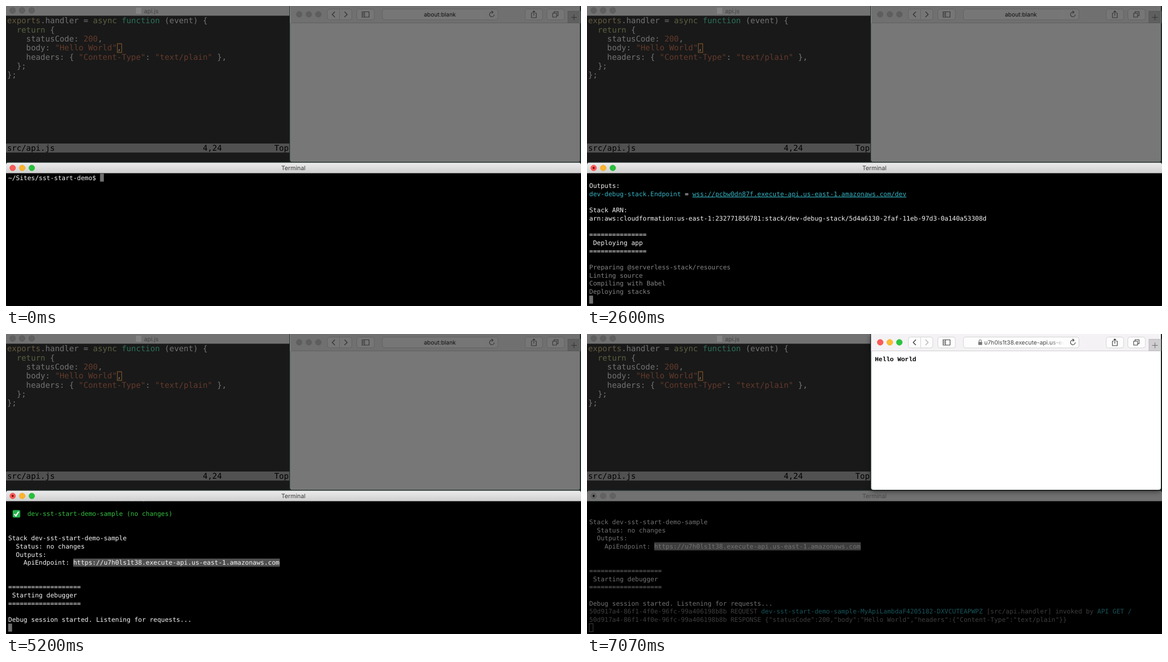
Write an HTML page that moves like this. It is 1035 px wide and 541 px high and loops after 8000 ms.

```html
<!DOCTYPE html>
<html lang="en">
<head>
<meta charset="utf-8">
<title>Terminal demo</title>
<style>
html, body { margin: 0; width: 100%; height: 100%; overflow: hidden; background: #1c2b28; }
svg { display: block; width: 100vw; height: 100vh; }
text { white-space: pre; text-rendering: geometricPrecision; }
.ui { font-family: Inter, Roboto, sans-serif; }
.code { font: 14.28px "DejaVu Sans Mono", monospace; fill: #727272; }
.log { font: 11.436px "DejaVu Sans Mono", monospace; fill: #f4f4f4; }
.page { font: bold 11.25px "Liberation Mono", monospace; }
.off { display: none; }

.code .id { fill: #635a3f; }
.code .kw { fill: #586040; }
.code .fn { fill: #2c7055; }
.code .str { fill: #633a2b; }

.log .dim { fill: #858585; }
.log .cyan { fill: #35b5c3; }
.log .link { fill: #35b5c3; text-decoration: underline; }
.log .ok { fill: #33bf3f; }
#sel { fill: #505050; }
#cursor { fill: #6e6e6e; }
#term.idle #sel { fill: #848484; }
#term.idle #cursor { fill: none; stroke: #8c8c8c; }
#term.idle .bar { fill: #f4f4f4; }
#term.idle .title { fill: #999; }
#term.idle .light { fill: #d2d2d2; stroke: #bcbcbc; }
#term.idle #busy { fill: #222; }

.icon { fill: none; stroke: #707070; stroke-width: 1.1; }
.chevron { stroke-width: 1.4; }
.btn { fill: #fdfdfd; stroke: #d6d4d6; }
#web .light { fill: #cbcbcb; stroke: #bcbcbc; }
#web.active { filter: drop-shadow(0 3px 5px rgba(0, 0, 0, .55)); }
#web.active .icon { stroke: #3d3d3d; }
#web.active .red { fill: #fc5b57; stroke: #e2463f; }
#web.active .amber { fill: #fdbb2e; stroke: #dfa023; }
#web.active .green { fill: #29c53f; stroke: #1dad2b; }
#web.active #share { stroke: #555; }
#web.active #share.ready { stroke: #3a3a3a; }
#web.active #next.none { stroke: #b4b4b4; }
</style>
</head>
<body>
<svg viewBox="0 0 1035 541" preserveAspectRatio="none">
  <defs>
    <linearGradient id="metal" x2="0" y2="1">
      <stop stop-color="#ececec"/><stop offset="1" stop-color="#cfcfcf"/>
    </linearGradient>
    <linearGradient id="fade">
      <stop stop-color="#fff" stop-opacity="0"/><stop offset="1" stop-color="#fff"/>
    </linearGradient>
    <clipPath id="screen"><rect y="301.5" width="1035" height="240"/></clipPath>
    <clipPath id="field"><rect x="678" y="5" width="181" height="20"/></clipPath>
    <clipPath id="pill"><rect x="677.5" y="5.5" width="208" height="19.5" rx="4"/></clipPath>
  </defs>

  <g id="editor">
    <rect width="510" height="281" fill="#191919"/>
    <rect width="510" height="17.5" fill="#727272"/>
    <g fill="#606060" stroke="#575757" stroke-width=".6">
      <circle cx="12" cy="8" r="5.3"/><circle cx="29" cy="8" r="5.3"/><circle cx="46.3" cy="8" r="5.3"/>
    </g>
    <rect x="234" y="3" width="9.5" height="11" fill="#848484"/>
    <text class="ui" x="248.5" y="12.6" font-size="10.6" fill="#434343">api.js</text>
    <rect y="248" width="510" height="16.3" fill="#515151"/>
    <rect x="200.4" y="68" width="7.8" height="15.8" fill="none" stroke="#94602c"/>
    <g id="source" class="code"></g>
  </g>

  <g id="term">
    <rect y="282.5" width="1035" height="258.5" rx="4" fill="#000"/>
    <path class="bar" d="M0 301.5V286.5Q0 282.5 4 282.5H1031Q1035 282.5 1035 286.5V301.5Z" fill="url(#metal)"/>
    <g stroke-width=".6">
      <circle class="light" cx="12" cy="292" r="5.2" fill="#fc5b57" stroke="#e2463f"/>
      <circle class="light" cx="29.2" cy="292" r="5.2" fill="#fdb42b" stroke="#dfa023"/>
      <circle class="light" cx="46.4" cy="292" r="5.2" fill="#27c03c" stroke="#1dad2b"/>
    </g>
    <circle id="busy" cx="12" cy="292" r="1.9" fill="#7a0a08"/>
    <text class="ui title" x="517.3" y="296.3" font-size="10.8" text-anchor="middle" fill="#3c3c3c">Terminal</text>
    <g clip-path="url(#screen)">
      <g id="log" class="log">
        <rect id="sel" height="14.6"/>
        <rect id="cursor" width="6.9" height="14.4"/>
        <path id="marks" d="M4 304.5H2.3V314.5H4M1031 304.5H1032.7V314.5H1031" fill="none" stroke="#8a8a8a"/>
      </g>
    </g>
    <rect id="termShade" y="282" width="1035" height="259" opacity="0"/>
  </g>

  <g id="web">
    <path d="M511.5 0H1033V277Q1033 281 1029 281H515.5Q511.5 281 511.5 277Z" fill="#fff"/>
    <rect x="511.5" width="521.5" height="31" fill="#f4f2f4"/>
    <path d="M511.5 30.5H1033" stroke="#d0ced0"/>
    <g stroke-width=".6">
      <circle class="light red" cx="527.8" cy="15" r="5.3"/>
      <circle class="light amber" cx="545" cy="15" r="5.3"/>
      <circle class="light green" cx="562.2" cy="15" r="5.3"/>
    </g>
    <g class="btn">
      <rect x="578.5" y="5.5" width="44" height="19.5" rx="4"/>
      <rect x="631.5" y="5.5" width="31.5" height="19.5" rx="4"/>
      <rect x="677.5" y="5.5" width="208" height="19.5" rx="4"/>
      <rect x="934.5" y="5.5" width="31.5" height="19.5" rx="4"/>
      <rect x="973.5" y="5.5" width="31.5" height="19.5" rx="4"/>
      <path d="M600.5 5.5V25"/>
    </g>
    <rect x="1011.5" y="9.5" width="21.5" height="21" fill="#cfcdcf" stroke="#bdbbbd"/>
    <path d="M1022.3 15.5V25.5M1017.3 20.5H1027.3" stroke="#6c6c6c"/>
    <path class="icon chevron" d="M592 10.3L587.2 15.2L592 20.1"/>
    <path id="next" class="icon chevron" d="M609.3 10.3L614.1 15.2L609.3 20.1"/>
    <path class="icon" d="M641 10.5H653.5V20H641ZM645.3 10.5V20M642.3 13H644M642.3 15H644M642.3 17H644"/>
    <path id="share" class="icon" d="M948 13H945.8V21H954.5V13H952.3M950.1 17.5V9M947.7 11.3L950.1 8.9L952.5 11.3"/>
    <path class="icon" d="M984 13H991V20H984ZM986.5 13V10.3H993.7V17.5H991"/>
    <rect id="ring" x="676.8" y="4.2" width="209.5" height="21.5" rx="5" fill="none" stroke="#86b4ee" stroke-width="2.8"/>
    <rect id="mark" x="751" y="8.5" width="60" height="13.5" fill="#b3d4fd"/>
    <g clip-path="url(#field)" class="ui" font-size="10.4">
      <text id="blank" x="781" y="19" text-anchor="middle" fill="#222">about:blank</text>
      <text id="url" y="19" fill="#484848">u7h0ls1t38.execute-api.us-east-1.amazonaws.com</text>
      <rect x="834" y="7" width="25" height="16" fill="url(#fade)"/>
    </g>
    <g id="lock">
      <rect x="704.3" y="14.2" width="7" height="5.5" rx=".8" fill="#777"/>
      <path d="M705.7 14.5V12.6A2.1 2.1 0 0 1 709.9 12.6V14.5" fill="none" stroke="#777" stroke-width="1.1"/>
    </g>
    <path id="reload" class="icon" d="M876.5 11.3A4.3 4.3 0 1 0 878.9 15.2M874 8.7L876.8 11.3L874 13.7"/>
    <path id="stop" class="icon" d="M870.8 10.8L879.2 19.2M879.2 10.8L870.8 19.2"/>
    <g clip-path="url(#pill)"><rect id="load" x="678" y="22.8" height="2.2" fill="#1d6fe8"/></g>
    <text id="hello" class="page" x="518.3" y="49">Hello World</text>
    <path id="webShade" d="M511.5 0H1033V277Q1033 281 1029 281H515.5Q511.5 281 511.5 277Z" opacity=".535"/>
  </g>
</svg>

<script>
const $ = id => document.getElementById(id);
const LOOP = 8000, SHADE = 0.535;
const COL = 6.885, ROW = 14.667, LEFT = 4, TOP = 302.3, LAST_ROW = 15;
const NS = "http://www.w3.org/2000/svg";
const PROMPT = "~/Sites/sst-start-demo$ ", COMMAND = "npx sst start";
const API = "https://u7h0ls1t38.execute-api.us-east-1.amazonaws.com";
const ID = "50d917a4-86f1-4f0e-96fc-99a406198b8b ";

function add(parent, name, attrs) {
  const el = document.createElementNS(NS, name);
  for (const k in attrs) el.setAttribute(k, attrs[k]);
  parent.append(el);
  return el;
}

// A line is a list of [text, class] spans.
function addLine(parent, spans, x, y) {
  const line = add(parent, "text", { x, y });
  for (const [str, cls = ""] of spans) add(line, "tspan", { class: cls }).textContent = str;
  return line;
}

const plain = str => [[str]];
const dim = str => [[str, "dim"]];
const done = name => [["     " + name + " (no changes)", "ok"]];
const banner = str => {
  const rule = "=".repeat(str.length + 2);
  return [rule, " " + str, rule, ""];
};
const toSpans = line => typeof line === "string" ? plain(line) : line;

const source = [
  [["exports", "id"], [".handler = "], ["async ", "kw"], ["function", "fn"], [" (event) {"]],
  [["  return", "kw"], [" {"]],
  [["    statusCode: "], ["200", "str"], [","]],
  [["    body: "], ['"Hello World"', "str"], [","]],
  [["    headers: { "], ['"Content-Type"', "str"], [": "], ['"text/plain"', "str"], [" },"]],
  "  };",
  "};"
].map(toSpans);
source.forEach((spans, i) => addLine($("source"), spans, 2, 31.2 + i * 16.36));
const status = "src/api.js".padEnd(41) + "4,24".padEnd(15) + "Top";
addLine($("source"), plain(status), 2, 260.6).setAttribute("fill", "#000");

const log = [
  PROMPT, "",
  ...banner("Deploying debug stack"),
  dim("Deploying stacks"), "",
  "dev-debug-stack: deploying...", "",
  done("dev-debug-stack"), "", "",
  "Outputs:",
  [["dev-debug-stack.Endpoint", "cyan"], [" = "],
   ["wss://pcbw0dn87f.execute-api.us-east-1.amazonaws.com/dev", "link"]],
  "",
  "Stack ARN:",
  "arn:aws:cloudformation:us-east-1:232771856781:stack/dev-debug-stack/5d4a6130-2faf-11eb-97d3-0a140a53308d",
  "",
  ...banner("Deploying app"),
  dim("Preparing @serverless-stack/resources"),
  dim("Linting source"),
  dim("Compiling with Babel"),
  dim("Deploying stacks"), "",
  "dev-sst-start-demo-sample: deploying...", "",
  done("dev-sst-start-demo-sample"), "", "",
  "Stack dev-sst-start-demo-sample",
  "  Status: no changes",
  "  Outputs:",
  "    ApiEndpoint: " + API, "", "",
  ...banner("Starting debugger"),
  "Debug session started. Listening for requests...",
  [[ID + "REQUEST ", "dim"], ["dev-sst-start-demo-sample-MyApiLambdaF4205182-DXVCUTEAPWPZ", "cyan"],
   [" [src/api.handler] invoked by ", "dim"], ["API GET /", "cyan"]],
  dim(ID + 'RESPONSE {"statusCode":200,"body":"Hello World","headers":{"Content-Type":"text/plain"}}')
].map(toSpans);

const rowTop = i => TOP + i * ROW;
const rows = log.map((spans, i) => {
  const row = add($("log"), "g", {});
  addLine(row, spans, LEFT, rowTop(i) + 11.3);
  if (spans[0][1] === "ok") addTick(row, rowTop(i) + 0.5);
  return row;
});
const command = rows[0].querySelector("tspan");
const apiRow = log.findIndex(spans => spans[0][0].includes(API));

function addTick(row, y) {
  const g = add(row, "g", { transform: `translate(12 ${y})` });
  add(g, "rect", { width: 13.6, height: 13.6, rx: 2, fill: "#25b34b" });
  add(g, "path", { d: "M3 7.2L5.8 10.4L10.8 3", fill: "none", stroke: "#fff", "stroke-width": 2.2 });
}

// Stepped values: [time, value] pairs.
const typed = [130, 270, 330, 470, 530, 670, 730, 870, 930, 1070, 1130, 1200, 1270];
const printed = [[0, 0], [1400, 1], [1800, 6], [2070, 9], [2130, 16], [2470, 18], [2600, 27],
  [3000, 29], [3070, 32], [3130, 39], [3400, 44], [6730, 45], [6870, 46]];
const selected = [[0, 71], [3800, 60], [3870, 50], [4130, 44], [4200, 37], [4270, 31],
  [4530, 29], [4600, 27], [4670, 25], [4730, 23], [4800, 22], [4870, 20], [4930, 19], [5000, 18], [5200, 17]];
const loading = [[0, 0], [6130, 24], [6200, 30], [6270, 38], [6930, 150], [7000, 208], [7070, 0]];
const focus = [[0, 0], [5270, 0.5], [5330, 1]];
const at = (steps, t) => steps.reduce((v, [time, next]) => t >= time ? next : v, 0);

const show = (el, on) => el.classList.toggle("off", !on);
const set = (id, attrs) => {
  for (const k in attrs) $(id).setAttribute(k, attrs[k]);
};

function draw(t) {
  const keys = typed.filter(time => t >= time).length;
  const count = at(printed, t);
  const scroll = Math.max(0, count - LAST_ROW);
  command.textContent = PROMPT + COMMAND.slice(0, keys);
  rows.forEach((row, i) => show(row, i === 0 || i < count));
  set("log", { transform: `translate(0 ${-scroll * ROW})` });
  const col = count ? 0 : PROMPT.length + keys;
  set("cursor", { x: LEFT + col * COL, y: rowTop(count) });
  show($("marks"), count > 0);
  show($("busy"), t >= 1470);
  const from = at(selected, t);
  set("sel", { x: LEFT + from * COL, y: rowTop(apiRow), width: (71 - from) * COL });

  const web = at(focus, t);
  $("term").classList.toggle("idle", web === 1);
  $("web").classList.toggle("active", t >= 5800);
  set("termShade", { opacity: SHADE * web });
  set("webShade", { opacity: SHADE * (1 - web) });

  const loaded = t >= 7070, busy = t >= 6130 && !loaded, hasUrl = t >= 6070;
  show($("ring"), t >= 6000 && t < 6130);
  show($("mark"), t >= 6000 && !hasUrl);
  show($("blank"), !hasUrl);
  show($("url"), hasUrl);
  set("url", { x: loaded ? 715 : 708.7 });
  show($("lock"), loaded);
  show($("stop"), busy);
  show($("reload"), !busy);
  set("load", { width: at(loading, t) });
  show($("hello"), t >= 6930);
  $("share").classList.toggle("ready", t >= 6470);
  $("next").classList.toggle("none", loaded);
}

const start = performance.now();
function tick(now) {
  draw(Math.max(0, now - start) % LOOP);
  requestAnimationFrame(tick);
}
draw(0);
requestAnimationFrame(tick);
</script>
</body>
</html>
```
